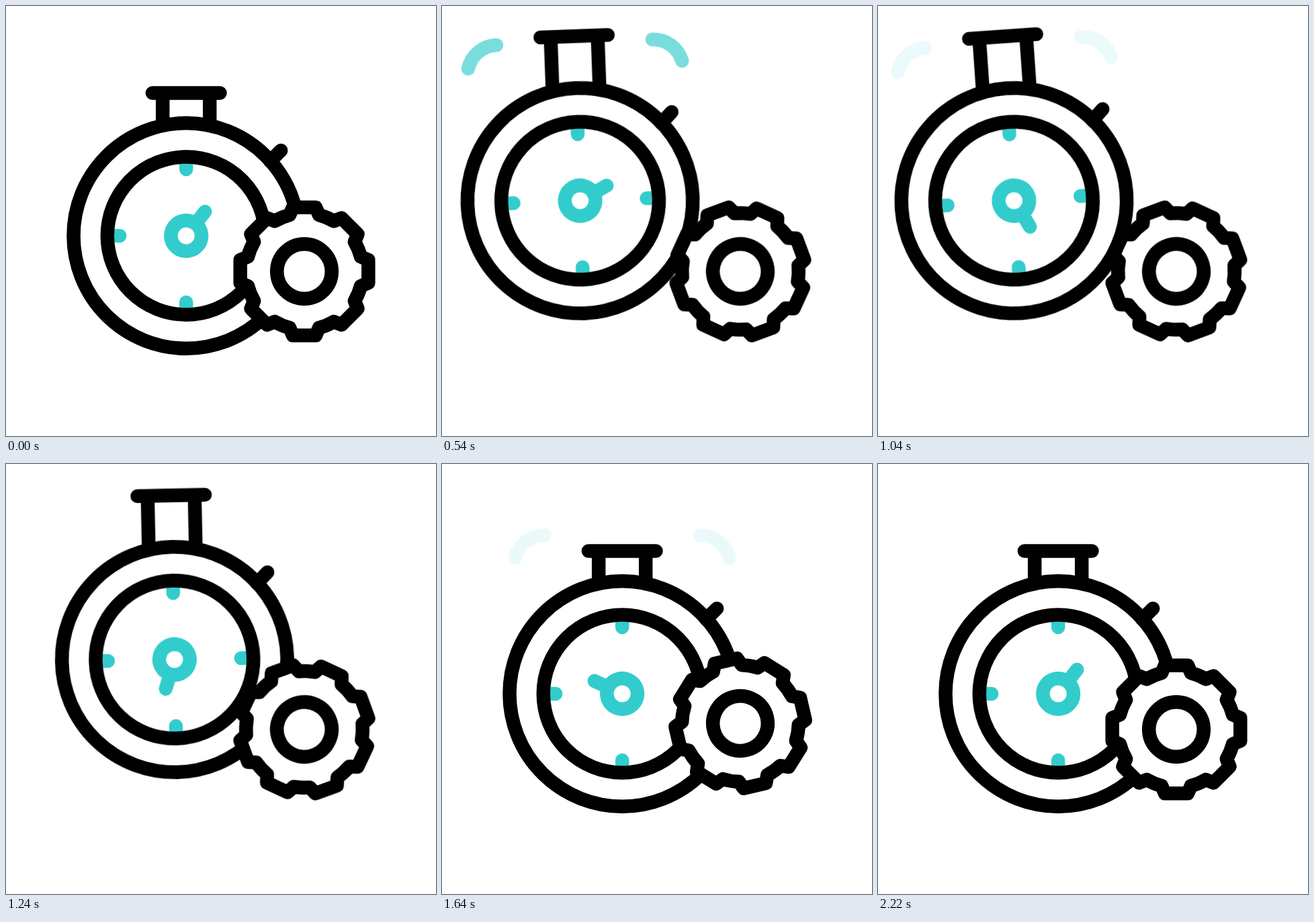
Recreate the animation shown at these times as an HTML page. Size 640 by 640 pixels, loop 2400 ms.

```html
<!DOCTYPE html>
<html lang="en">
<head>
<meta charset="utf-8">
<title>Stopwatch and gear</title>
<style>
  html, body { margin: 0; width: 100%; height: 100%; overflow: hidden; background: #fff; }
  svg { display: block; width: 100%; height: 100%; }
  .line { fill: none; stroke: #000; stroke-width: 20.5; stroke-linecap: round; stroke-linejoin: round; }
  .teal { stroke: #33cccc; }
  .solid { fill: #fff; }
</style>
</head>
<body>
<svg viewBox="0 0 640 640">
  <g id="watch">
    <g id="rays" class="line teal">
      <path class="ray"/>
      <path class="ray" transform="scale(-1 1)"/>
    </g>
    <path id="crown" class="line solid" stroke-linecap="butt"/>
    <circle class="line solid" r="167.7"/>
    <path class="line" d="M125-111L141-127"/>
    <path class="line teal" d="M0-99V-117M0 99V117M-99 0H-117M99 0H117"/>
    <circle class="line" r="117.4"/>
    <g id="hand" class="line teal">
      <path d="M0-24V-45.6"/>
      <circle r="22.8"/>
    </g>
  </g>
  <g id="gear">
    <path id="teeth" class="line solid"/>
    <circle class="line" r="40.8"/>
  </g>
</svg>
<script>
const LOOP = 2400;
const el = id => document.getElementById(id);
const [watch, rays, crown, hand, gear, teeth] =
  ['watch', 'rays', 'crown', 'hand', 'gear', 'teeth'].map(el);
const rayPaths = document.querySelectorAll('.ray');

// Keys are [time, value] pairs
const TILT = [[200, 0], [390, 8.4], [600, -4.6], [780, 8.8], [985, -4.2], [1380, 0]];
const SHIFT = [[390, 0], [565, -66], [600, -66], [785, 0], [962, -66.2], [1025, -66.2], [1350, 0]];
const LIFT = [[200, 0], [390, 1], [1225, 1], [1400, 0]];
const HOP = [[1250, 0], [1750, -10.2], [2200, 0]];
const RINGS = [380, 780, 1380];

const clamp = v => Math.min(1, Math.max(0, v));
const smooth = v => v * v * (3 - 2 * v);

function tween(keys, t) {
  if (t <= keys[0][0]) return keys[0][1];
  for (let i = 1; i < keys.length; i++) {
    const [t0, a] = keys[i - 1], [t1, b] = keys[i];
    if (t < t1) return a + (b - a) * smooth((t - t0) / (t1 - t0));
  }
  return keys[keys.length - 1][1];
}

// cubic-bezier(.333, 0, .833, 1)
function turnEase(x) {
  let lo = 0, hi = 1;
  for (let i = 0; i < 24; i++) {
    const u = (lo + hi) / 2, v = 1 - u;
    if (u * v * v + 2.5 * u * u * v + u * u * u < x) lo = u; else hi = u;
  }
  return smooth((lo + hi) / 2);
}

function gearPath() {
  const polar = (r, deg) => {
    const a = deg * Math.PI / 180;
    return (r * Math.sin(a)).toFixed(2) + ' ' + (-r * Math.cos(a)).toFixed(2);
  };
  let d = '';
  for (let a = 0; a < 360; a += 45) {
    d += (a ? 'L' : 'M') + polar(96.8, a - 10.1) + 'L' + polar(96.8, a + 10.1) +
      'L' + polar(86.8, a + 14.6) + 'A86.8 86.8 0 0 1 ' + polar(86.8, a + 30.4);
  }
  return d + 'Z';
}

function drawRays(t) {
  const start = RINGS.find(s => t > s && t < s + 280);
  if (start === undefined) {
    rays.setAttribute('opacity', 0);
    return;
  }
  const age = t - start;
  const k = clamp(age / 97), r = 44.6 * k;
  const d = `M${-72 - 87.2 * k} ${-132 - 70.5 * k}A${r} ${r} 0 0 1 ${-72 - 44 * k} ${-132 - 104 * k}`;
  rayPaths.forEach(p => p.setAttribute('d', d));
  rays.setAttribute('opacity', Math.min(clamp(age / 71), clamp((280 - age) / 180)));
}

function draw(t) {
  const lift = tween(LIFT, t);
  const turn = 360 * turnEase(clamp((t - 200) / 2000));
  const top = -212.5 - 32.5 * lift;
  watch.setAttribute('transform',
    `translate(${268.2 + tween(SHIFT, t)} ${342 - 52.2 * lift}) rotate(${tween(TILT, t)})`);
  crown.setAttribute('d', `M-35 -166V${top}M35 -166V${top}M-50.3 ${top}H50.3`);
  hand.setAttribute('transform', `rotate(${37.9 + turn})`);
  gear.setAttribute('transform', `translate(444 ${395 + tween(HOP, t)}) rotate(${turn})`);
  drawRays(t);
}

teeth.setAttribute('d', gearPath());
const begin = performance.now();
function tick() {
  draw((performance.now() - begin) % LOOP);
  requestAnimationFrame(tick);
}
draw(0);
requestAnimationFrame(tick);
</script>
</body>
</html>
```
